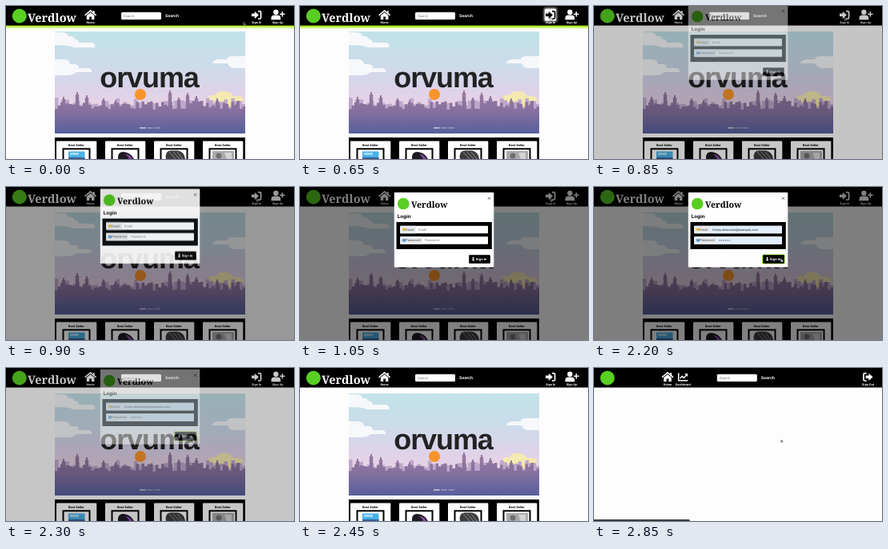
Recreate the animation shown at these times as an HTML page. Size 360x192 px, loop 3 s.

```html
<!DOCTYPE html>
<html lang="en">
<head>
<meta charset="utf-8">
<title>Shop sign in</title>
<style>
  html, body { margin: 0; width: 100%; height: 100%; overflow: hidden; background: #fdfdfd; }
  svg { display: block; width: 100vw; height: 100vh; }
  text { font-family: Inter, "Liberation Sans", sans-serif; text-rendering: geometricPrecision; }
  .bold { font-weight: 700; }
  .mid { text-anchor: middle; }
  .label { font-size: 3.6px; font-weight: 700; text-anchor: middle; fill: #fff; }
  .field { font-size: 4px; }
  .wordmark { font-family: "Noto Serif", "Liberation Serif", serif; font-weight: 700; }
  .banner { font: 700 36px "Liberation Sans", sans-serif; letter-spacing: -1.1px; }

  .anim { animation: 3s linear infinite both; }
  .hard { animation: 3s step-end infinite both; }
  #shop { animation-name: shop; }
  #account { animation-name: account; }
  #glow { animation-name: glow; }
  #halo { animation-name: halo; }
  #backdrop { animation-name: backdrop; }
  #modal { animation-name: modal; }
  #empty { animation-name: empty; }
  #filled { animation-name: filled; }
  #ring { animation-name: ring; }
  #status { animation-name: status; }
  #cursor { animation-name: cursor; }
  #arrow { animation-name: arrow; }
  #hand { animation-name: hand; }

  @keyframes shop { 0% { visibility: visible } 93.15%, 100% { visibility: hidden } }
  @keyframes account { 0% { visibility: hidden } 93.15%, 100% { visibility: visible } }
  @keyframes glow { 0% { opacity: .9 } 7%, 25% { opacity: 1 } 28%, 100% { opacity: 0 } }
  @keyframes halo { 0%, 13% { opacity: 0 } 19%, 25% { opacity: 1 } 28%, 100% { opacity: 0 } }
  @keyframes backdrop {
    0%, 26.33% { opacity: 0 }
    28.33% { opacity: .44 }
    31%, 73.33% { opacity: 1 }
    76.67% { opacity: .44 }
    79.3%, 100% { opacity: 0 }
  }
  @keyframes modal {
    0%, 26.33% { opacity: 0; transform: translateY(-13px) }
    28.33% { opacity: .45; transform: translateY(-8px) }
    30.5% { opacity: 1; transform: translateY(-3.5px) }
    34%, 73.33% { opacity: 1; transform: none }
    76.67% { opacity: .46; transform: translateY(-5px) }
    79%, 100% { opacity: 0; transform: translateY(-9px) }
  }
  @keyframes empty { 0% { opacity: 1 } 39.8%, 100% { opacity: 0 } }
  @keyframes filled { 0% { opacity: 0 } 39.8%, 100% { opacity: 1 } }
  @keyframes ring { 0%, 47% { opacity: 0 } 50%, 100% { opacity: 1 } }
  @keyframes status { 0% { opacity: 0 } 86.5%, 100% { opacity: 1 } }
  @keyframes cursor {
    0% { transform: translate(297px, 20px); animation-timing-function: ease-in-out }
    15%, 38% { transform: translate(313px, 14px); animation-timing-function: ease-in-out }
    49%, 100% { transform: translate(233.6px, 89.6px) }
  }
  @keyframes arrow { 0% { opacity: 1 } 13% { opacity: 0 } 28% { opacity: 1 } 48% { opacity: 0 } 79%, 100% { opacity: 1 } }
  @keyframes hand { 0% { opacity: 0 } 13% { opacity: 1 } 28% { opacity: 0 } 48% { opacity: 1 } 79%, 100% { opacity: 0 } }
</style>
</head>
<body>
<svg viewBox="0 0 360 192" preserveAspectRatio="none">
  <defs>
    <linearGradient id="sky" x2="0" y2="1">
      <stop offset="0" stop-color="#c1e2e8"/>
      <stop offset=".3" stop-color="#cbdcea"/>
      <stop offset=".55" stop-color="#dcd3ea"/>
      <stop offset=".75" stop-color="#ead2e4"/>
      <stop offset="1" stop-color="#ead2e4"/>
    </linearGradient>
    <linearGradient id="town" gradientUnits="userSpaceOnUse" x1="0" y1="110" x2="0" y2="160">
      <stop offset="0" stop-color="#987a9f"/>
      <stop offset=".45" stop-color="#84709f"/>
      <stop offset="1" stop-color="#565f9c"/>
    </linearGradient>
    <filter id="blur" x="-50%" y="-50%" width="200%" height="200%"><feGaussianBlur stdDeviation="1.8"/></filter>
    <filter id="soft" x="-50%" y="-50%" width="200%" height="200%"><feGaussianBlur stdDeviation=".7"/></filter>
    <clipPath id="slide"><rect x="61" y="32" width="238" height="128"/></clipPath>

    <g id="house" fill="#fff">
      <path d="M-6.6.1L0-5.4 6.6.1" fill="none" stroke="#fff" stroke-width="1.5" stroke-linecap="round"/>
      <path d="M3.2-5.2H5V-1H3.2ZM-4.8.9L0-3.1 4.8.9V5.9H1.4V2.2H-1.4V5.9H-4.8Z"/>
    </g>
    <g id="door">
      <path d="M-6-1.8H-2.2V-4.6L3 0-2.2 4.6V1.8H-6Z" fill="currentColor"/>
      <path d="M2-4.7H4.2Q5.6-4.7 5.6-3.3V3.3Q5.6 4.7 4.2 4.7H2" fill="none" stroke="currentColor" stroke-width="1.7"/>
    </g>
    <g id="exit" fill="#fff">
      <path d="M-3-1.8H.8V-4.6L6 0 .8 4.6V1.8H-3Z"/>
      <path d="M-2-4.7H-4.2Q-5.6-4.7-5.6-3.3V3.3Q-5.6 4.7-4.2 4.7H-2" fill="none" stroke="#fff" stroke-width="1.7"/>
    </g>
    <g id="person" fill="#fff">
      <circle cx="-2.4" cy="-3.3" r="3.2"/>
      <path d="M-8.3 6.3V4.4Q-8.3.6-4.6.6H-.2Q3.5.6 3.5 4.4V6.3Z"/>
      <path d="M5.6-4V2.4M2.4-.8H8.8" stroke="#fff" stroke-width="1.5"/>
    </g>
    <g id="chart" fill="none" stroke="#fff" stroke-width="1.5">
      <path d="M-5.6-5V4.6H6M-3.6 1.8L-1.2-.9 1 1.2 4.6-2.6"/>
      <path d="M1.8-4.2H5.7V-.3Z" fill="#fff" stroke="none"/>
    </g>
    <g id="search">
      <rect x="144" y="7.7" width="50" height="9.3" rx="1.6" fill="#fff"/>
      <text x="147" y="13.8" class="field" fill="#777">Search</text>
      <text x="199" y="14.1" class="bold" font-size="5" fill="#fff">Search</text>
    </g>
  </defs>

  <rect width="360" height="192" fill="#fdfdfd"/>

  <g id="shop" class="hard">
    <g id="glow" class="anim"><rect x="-8" y="10" width="376" height="17" fill="#a4ea00" filter="url(#blur)"/></g>

    <g clip-path="url(#slide)">
      <rect x="61" y="32" width="238" height="128" fill="url(#sky)"/>
      <circle cx="272" cy="119" r="12" fill="#f5e6a0"/>
      <g fill="#f6f8fb">
        <path d="M61 33H70Q77 33 78 38 84 37 85 41 91 42 91 46H108Q113 48 111 52H84Q80 49 61 49Z"/>
        <path d="M61 67H73Q79 67 80 73H87Q91 74 91 78H104Q108 80 107 83H88Q84 87 76 87H61Z"/>
        <path d="M299 63H281Q276 64 276 67H265Q258 68 258 72H277Q279 78 286 78H299Z"/>
      </g>
      <path d="M253 115Q254 111 262 112 266 106 273 107 281 107 284 113H292Q297 114 296 120H253Z" fill="#f5e9b2"/>
      <path id="far" fill="#bda7cb"/>
      <path id="near" fill="url(#town)"/>
      <text x="179" y="101.5" class="banner mid" fill="#222">orvuma</text>
      <circle cx="168" cy="111" r="7" fill="#f9942a"/>
      <g fill="#fff">
        <rect x="167" y="152.5" width="7.7" height="1"/>
        <rect x="176.2" y="152.5" width="7.7" height="1" opacity=".5"/>
        <rect x="185.4" y="152.5" width="7.7" height="1" opacity=".5"/>
      </g>
    </g>

    <rect x="61" y="165" width="238" height="27" fill="#000"/>
    <g id="cards"></g>
    <g transform="translate(88 0)">
      <rect x="-10" y="182.5" width="20.5" height="9.5" fill="#48b1e6"/>
      <rect x="-8" y="184" width="11" height="3" fill="#a5daf2"/>
      <rect x="-10" y="190" width="20.5" height="2" fill="#3a5f95"/>
    </g>
    <g transform="translate(149 0)">
      <path d="M-9 192Q-10 183 -2 183 7 184 11 192Z" fill="#1d1a22"/>
      <path d="M0 186Q6 186 9 192H5Q3 188 0 186Z" fill="#8a4aa6"/>
    </g>
    <g transform="translate(210 0)">
      <path d="M-10 192Q-12 182-4 181.5H5Q13 183 14 192Z" fill="#3c3c3c"/>
      <path d="M-6 183L2 192M-1 183L7 192M4 183L11 192" stroke="#9a9a9a" stroke-width=".9"/>
    </g>
    <g transform="translate(271 0)">
      <rect x="-13" y="182" width="27" height="10" fill="#aaa"/>
      <circle cx="-5" cy="188" r="3.5" fill="#707070"/>
      <path d="M2 184H11V192H5Z" fill="#d4d4d4"/>
    </g>

    <rect width="360" height="24.5" fill="#000"/>
    <text x="27" y="19.5" class="wordmark" font-size="14.5" fill="#fff">Verdlow</text>
    <use href="#house" x="105.6" y="11.2"/>
    <text x="105.6" y="21.6" class="label">Home</text>
    <use href="#search"/>
    <use href="#door" x="313" y="11.3" color="#fff"/>
    <text x="313.2" y="21.6" class="label">Sign In</text>
    <g id="halo" class="anim">
      <rect x="305" y="2.5" width="16" height="17" rx="1.5" fill="#fff" opacity=".8" filter="url(#blur)"/>
      <rect x="306" y="3.8" width="14" height="14.6" rx="1" fill="#fff"/>
      <use href="#door" x="313" y="11.3" color="#000"/>
    </g>
    <use href="#person" x="339.8" y="11"/>
    <text x="339.8" y="21.6" class="label">Sign Up</text>
  </g>

  <g id="account" class="hard">
    <rect width="360" height="24.5" fill="#000"/>
    <use href="#house" x="92" y="11.2"/>
    <text x="92" y="21.6" class="label">Home</text>
    <use href="#chart" x="111.3" y="11.2"/>
    <text x="111.3" y="21.6" class="label">Dashboard</text>
    <use href="#search" x="9.8"/>
    <use href="#exit" x="342.6" y="11.3"/>
    <text x="342.6" y="21.6" class="label">Sign Out</text>
  </g>
  <circle cx="16.8" cy="12.5" r="9" fill="#58cf22"/>

  <rect id="backdrop" class="anim" width="360" height="192" fill="rgba(0,0,0,.5)"/>

  <g id="modal" class="anim">
    <rect x="117.8" y="6.8" width="124.5" height="94" rx="1" fill="#fff"/>
    <circle cx="129.2" cy="21" r="7.3" fill="#58cf22"/>
    <text x="139" y="26.2" class="wordmark" font-size="10.8">Verdlow</text>
    <path d="M235 12.7L238 15.7M238 12.7L235 15.7" stroke="#333" stroke-width=".7"/>
    <text x="121.8" y="38.6" class="bold" font-size="6.2">Login</text>
    <rect x="120.5" y="44" width="119.3" height="34" fill="#000"/>
    <g class="field">
      <rect x="125" y="48.7" width="110" height="9.5" rx="1" fill="#fff"/>
      <rect x="125" y="62.2" width="110" height="9.5" rx="1" fill="#fff"/>
      <g id="empty" class="hard" fill="#777">
        <text x="148" y="54.9">Email</text>
        <text x="156" y="68.4">Password</text>
      </g>
      <g id="filled" class="hard">
        <rect x="145" y="48.7" width="90" height="9.5" rx="1" fill="#e3effd"/>
        <rect x="152.5" y="62.2" width="82.5" height="9.5" rx="1" fill="#e3effd"/>
        <text x="148.3" y="54.9" font-size="3.8" fill="#222">tolvey.elsmerick@example.com</text>
        <path d="M156.6 67H171" stroke="#222" stroke-width="1" stroke-linecap="round" stroke-dasharray="0 1.6"/>
      </g>
      <rect x="125" y="48.7" width="20" height="9.5" rx="1" fill="#e9ecef"/>
      <rect x="125" y="62.2" width="27.5" height="9.5" rx="1" fill="#e9ecef"/>
      <rect x="128" y="51.8" width="4" height="3.3" rx=".5" fill="#e5b944"/>
      <rect x="128" y="65.3" width="4" height="3.3" rx=".5" fill="#4e94d0"/>
      <text x="132.3" y="54.9" fill="#444">Email</text>
      <text x="132.3" y="68.4" fill="#444">Password</text>
    </g>
    <rect id="ring" class="anim" x="210.2" y="84.6" width="28.4" height="12" rx="1.5" fill="#9bee10" filter="url(#soft)"/>
    <rect x="211.2" y="85.2" width="26.6" height="10.8" rx="1" fill="#000"/>
    <circle cx="216.6" cy="89" r="1.1" fill="#fff"/>
    <path d="M215 91.2Q216.6 89.4 218.2 91.2L216.6 93Z" fill="#fff"/>
    <text x="219.8" y="92.1" class="bold" font-size="4.1" fill="#fff">Sign In</text>
  </g>

  <path id="status" class="hard" d="M0 190H118.5Q120 190 120 192H0Z" fill="#3d3d3d"/>

  <g id="cursor" class="anim">
    <path id="arrow" class="hard" d="M0 0V3.9L.9 3.1 1.5 4.4 2.1 4.1 1.5 2.9H2.7Z" fill="#000" stroke="#fff" stroke-width=".35"/>
    <path id="hand" class="hard" d="M0 0Q.6-.4.9 0V1.6L2.7 2.1V4.3H.3L-.9 2.5Q-.7 2 0 2.4Z" fill="#fff" stroke="#000" stroke-width=".4"/>
  </g>
</svg>
<script>
  const byId = id => document.getElementById(id);

  let seed = 7;
  const random = () => (seed = seed * 16807 % 2147483647) / 2147483647;

  // Flat-roofed houses of random height across the slide.
  const skyline = (top, spread, width) => {
    let d = "M61 160";
    for (let x = 61; x < 299; x += width) d += `V${top + random() * spread}H${x + width}`;
    return d + "V160Z";
  };
  const tower = ([x, y]) => `M${x - 2.2} 160V${y + 3}H${x - 1}V${y}H${x + 1}V${y + 3}H${x + 2.2}V160Z`;
  const towers = [[72, 114], [89, 108], [101, 112], [122, 116], [137, 118],
                  [205, 106], [216, 115], [227, 109], [238, 113], [264, 116], [289, 120]];

  byId("far").setAttribute("d", skyline(115, 12, 4.5));
  byId("near").setAttribute("d", skyline(119, 11, 3.5) + towers.map(tower).join(""));

  byId("cards").innerHTML = [88, 149, 210, 271].map(x => `
    <g transform="translate(${x} 0)">
      <rect x="-25" y="169.4" width="50.3" height="24" rx="1" fill="#fff"/>
      <text y="176" class="bold mid" font-size="3.8">Best Seller</text>
      <rect x="-17.5" y="178.3" width="35" height="14" fill="#000"/>
      <rect x="-15.5" y="180.3" width="31" height="12" fill="#fff"/>
    </g>`).join("");
</script>
</body>
</html>
```
